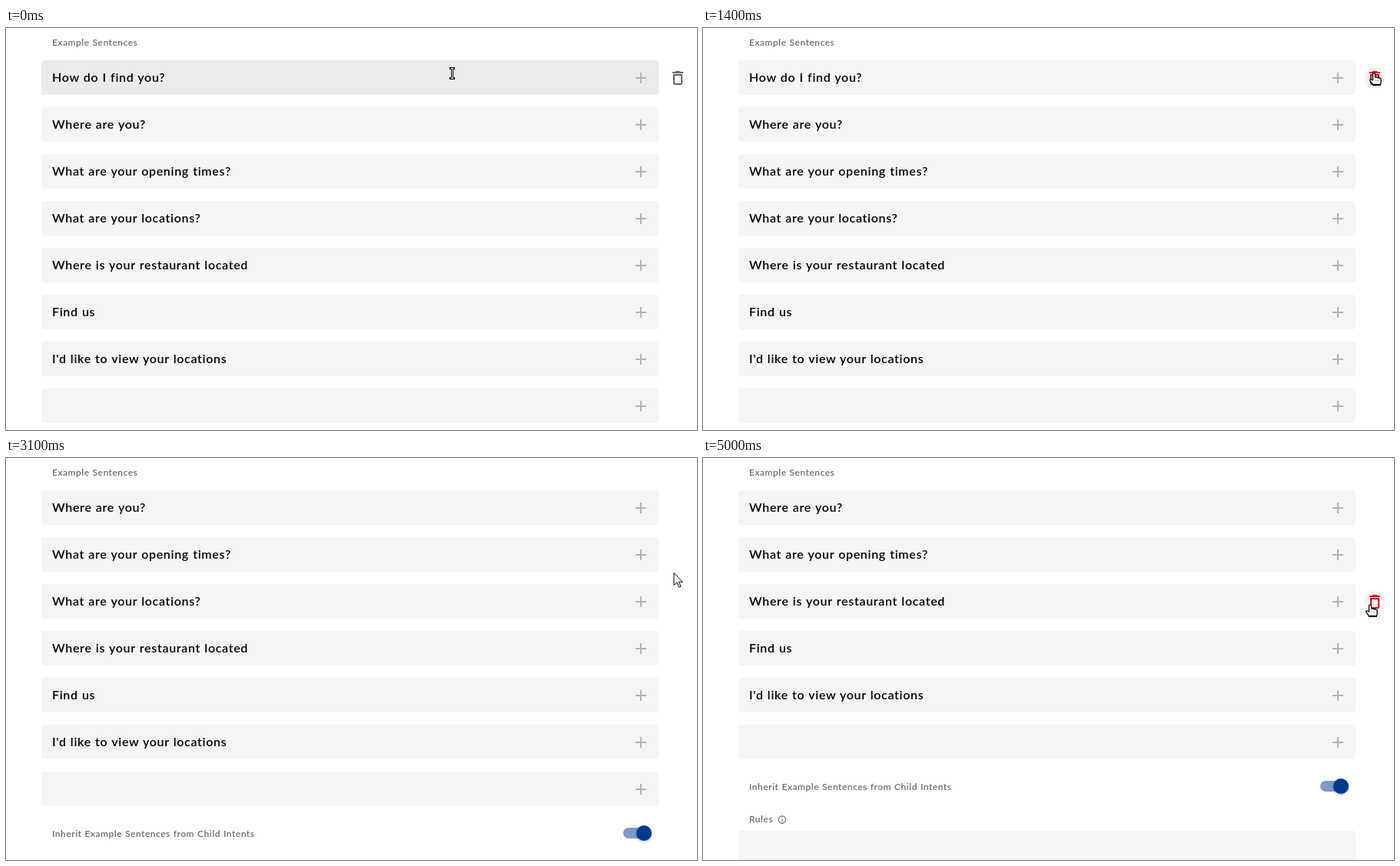
Write an HTML page that moves like this. It is 899 by 523 pixels and loops after 6000 ms.

```html
<!DOCTYPE html>
<html lang="en">
<head>
<meta charset="utf-8">
<title>Example sentences</title>
<style>
  html, body { margin: 0; width: 100%; height: 100%; overflow: hidden; background: #fff; }
  svg { display: block; width: 899px; height: 523px; }
  text { font-family: Lato, "Open Sans", sans-serif; font-weight: 600; white-space: pre; }
  .sentence { font-size: 16px; letter-spacing: .68px; word-spacing: .6px; fill: #000; }
  .label { font-size: 12px; letter-spacing: .5px; word-spacing: .5px; fill: #6b6b6b; }
  .knob { filter: drop-shadow(0 1px 1.5px rgba(0, 0, 0, .35)); }
</style>
</head>
<body>
<svg id="stage" viewBox="0 0 899 523"></svg>
<script>
const LOOP = 6000, STEP = 100, PITCH = 61, TOP = 42, ROW = 45;
const stage = document.getElementById('stage');

const sentences = [
  { text: 'How do I find you?', removed: 2200 },
  { text: 'Where are you?' },
  { text: 'What are your opening times?' },
  { text: 'What are your locations?', removed: 4800 },
  { text: 'Where is your restaurant located' },
  { text: 'Find us' },
  { text: "I'd like to view your locations" },
  { text: '' }
];

const easeInOut = p => p * p * (3 - 2 * p);
const easeOut = p => p * (2 - p);

// Pointer moves, each continuing from where the last one ended
const home = { x: 580.5, y: 59 };
const moves = [
  { from: 300, to: 900, x: 803.5, y: 65, ease: easeInOut },
  { from: 900, to: 1400, x: 873, y: 58, ease: easeOut },
  { from: 2600, to: 3200, x: 868, y: 156, ease: easeInOut },
  { from: 3200, to: 3600, x: 868, y: 190, ease: easeOut }
];

function pointerAt(t) {
  let { x, y } = home;
  for (const m of moves) {
    const p = m.ease(Math.min(1, Math.max(0, (t - m.from) / (m.to - m.from))));
    x += (m.x - x) * p;
    y += (m.y - y) * p;
  }
  return [Math.round(x * 2) / 2, Math.round(y)];
}

const label = (text, y) => `<text class="label" x="60" y="${y}">${text}</text>`;

const row = (text, y, hover) => `
  <rect x="46" y="${y}" width="803" height="${ROW}" rx="4" fill="${hover ? '#ebebeb' : '#f5f5f5'}"/>
  <text class="sentence" x="60" y="${y + 28}">${text}</text>
  <path d="M819 ${y + 23}h14m-7-7v14" stroke="#b2b2b2" stroke-width="2"/>`;

const trash = (y, hot) => `
  ${hot ? `<circle cx="874" cy="${y + 23}" r="14" fill="#f5f5f5"/>` : ''}
  <path transform="translate(862 ${y + 11})" fill="${hot ? '#d5001c' : '#666'}"
    d="M6 19c0 1.1.9 2 2 2h8c1.1 0 2-.9 2-2V7H6zM8 9h8v10H8zm7.5-5l-1-1h-5l-1 1H5v2h14V4z"
    fill-rule="evenodd"/>`;

const footer = y => `
  ${label('Inherit Example Sentences from Child Intents', y + 24)}
  <rect x="803" y="${y + 12}" width="35" height="14" rx="7" fill="#7d9ac8"/>
  <circle class="knob" cx="830" cy="${y + 19}" r="10" fill="#003a8f"/>
  ${label('Rules', y + 66)}
  <g fill="none" stroke="#666" stroke-width="1.1">
    <circle cx="103" cy="${y + 62.5}" r="4.6"/>
    <path d="M103 ${y + 62}v3m0-5.2v1.2"/>
  </g>
  <rect x="46" y="${y + 77}" width="803" height="90" rx="4" fill="#f5f5f5"/>`;

const BEAM = 'M-2-6.5h4M0-6.5v13M-2 6.5h4';
const cursors = {
  beam: `<path d="${BEAM}" stroke="#000" stroke-width="3" stroke-linecap="square"/>
    <path d="${BEAM}" stroke="#fff"/>`,
  arrow: '<path d="M.5.5v16l4-3.5 2.6 6.2 2.4-1-2.6-6h5z" fill="#fff" stroke="#000"/>',
  hand: `<path d="M-1.5 10V1.8q1.5-2.4 3 0V6q1.6-1 2.6.6 1.6-.9 2.6.6 2.4-.5 2.4 1.8v3q0 2-1 4.3H-1.5
    q-1-2.6-4-6.1 0-2.6 4-.2z" fill="#fff" stroke="#000" stroke-width="1.3" stroke-linejoin="round"/>
    <path d="M-1.5 15.8H8.3" stroke="#000" stroke-width="2"/>
    <path d="M1 10.5h6" stroke="#777" stroke-dasharray="1 1"/>`
};

function draw(t) {
  const list = sentences.filter(s => !(t >= s.removed));
  const [x, y] = pointerAt(t);
  const active = Math.floor((y - TOP) / PITCH);
  const rowY = TOP + active * PITCH;
  const onLine = y - rowY <= ROW;
  const inRow = x < 849 && onLine;
  const hot = Math.hypot(x - 874, y - rowY - 23) < 20;
  const kind = hot || (inRow && x > 812) ? 'hand' : inRow ? 'beam' : 'arrow';

  stage.innerHTML = label('Example Sentences', 23)
    + list.map((s, i) => row(s.text, TOP + i * PITCH, inRow && i === active)).join('')
    + footer(TOP + list.length * PITCH)
    + (onLine ? trash(rowY, hot) : '')
    + `<g fill="none" transform="translate(${x} ${y})">${cursors[kind]}</g>`;
}

let shown = -1;
const start = performance.now();
function tick() {
  const t = Math.floor(((performance.now() - start) % LOOP) / STEP) * STEP;
  if (t !== shown) draw(shown = t);
  requestAnimationFrame(tick);
}
tick();
</script>
</body>
</html>
```
